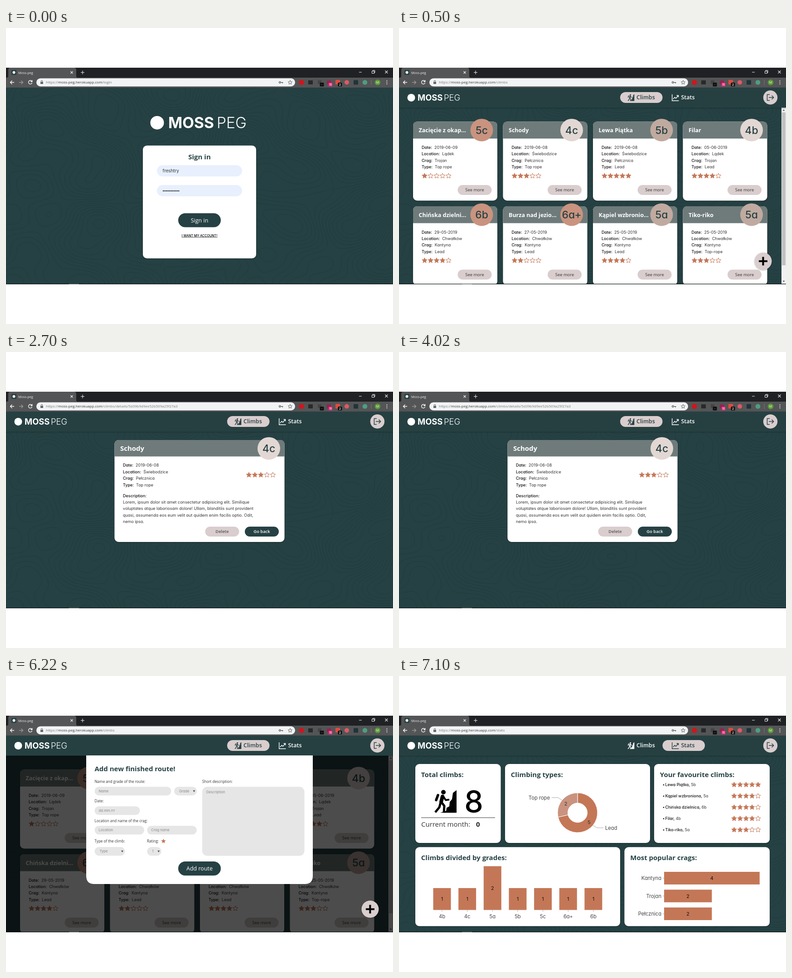
These frames come from a looping animation (854x656 px, 8000 ms). An HTML page:

```html
<!DOCTYPE html>
<html lang="en">
<head>
<meta charset="utf-8">
<title>Moss-peg</title>
<style>
  html, body { margin: 0; width: 100%; height: 100%; overflow: hidden; background: #fff; }
  svg { display: block; width: 854px; height: 656px; font-family: "Open Sans", "Noto Sans", sans-serif; }
  text { white-space: pre; }
  .geo { font-family: Inter, sans-serif; font-feature-settings: "cv11"; }
</style>
</head>
<body>
<svg id="stage" viewBox="0 0 854 656"></svg>
<script>
const TEAL = '#264143', PINK = '#d9cdce', RUST = '#c47757', SALMON = '#c9937f', SAND = '#c0aaa0', CREAM = '#e2d7d3';
const GREY = '#6e7b7a', FIELD = '#e6e6e6', INK = '#333';

// Drawing helpers; each returns SVG markup
const rect = (x, y, w, h, fill, r = 0, more = '') =>
  `<rect x="${x}" y="${y}" width="${w}" height="${h}" rx="${r}" fill="${fill}" ${more}/>`;
const disc = (x, y, r, fill, more = '') => `<circle cx="${x}" cy="${y}" r="${r}" fill="${fill}" ${more}/>`;
const line = (d, stroke, w = 1, more = '') => `<path d="${d}" fill="none" stroke="${stroke}" stroke-width="${w}" ${more}/>`;
const shape = (d, fill) => `<path d="${d}" fill="${fill}"/>`;
const text = (x, y, s, size, fill = INK, weight = 400, more = '') =>
  `<text x="${x}" y="${y}" font-size="${size}" fill="${fill}" font-weight="${weight}" ${more}>${s}</text>`;
const geo = (x, y, s, size, fill, weight, more = '') => text(x, y, s, size, fill, weight, 'class="geo" ' + more);
const MID = 'text-anchor="middle"', END = 'text-anchor="end"';
const at = (x, y, s, scale = 1) => `<g transform="translate(${x} ${y}) scale(${scale})">${s}</g>`;
const shadow = 'filter="url(#shadow)"';

function starPath(x, y, r) {
  const points = Array.from({ length: 10 }, (_, i) => {
    const a = i * Math.PI / 5, q = i % 2 ? r * .45 : r;
    return (x + q * Math.sin(a)).toFixed(2) + ' ' + (y - q * Math.cos(a)).toFixed(2);
  });
  return `M${points.join('L')}Z`;
}
const stars = (x, y, n) => [0, 1, 2, 3, 4].map(i =>
  `<path d="${starPath(x + i * 13.2, y, 6)}" fill="${i < n ? RUST : 'none'}" stroke="${RUST}" stroke-linejoin="round"/>`).join('');

const button = (x, y, w, h, label, size, fill, color, weight = 400) =>
  rect(x, y, w, h, fill, h / 2) + text(x + w / 2, y + h / 2 + size * .36, label, size, color, weight, MID);

// Contour lines of a smooth height field, traced triangle by triangle
function contours() {
  const { sin, ceil } = Math, cell = 6, step = .36;
  const height = (x, y) => sin(x / 57 + 1.6 * sin(y / 63)) + sin(y / 43 + 1.7 * sin(x / 71)) +
    .6 * sin((x + y) / 37) + .3 * sin((x - 2 * y) / 31);
  const point = (x, y) => [x, y, height(x, y)];
  let d = '';
  const trace = tri => {
    const hs = tri.map(p => p[2]), top = Math.max(...hs);
    for (let level = ceil(Math.min(...hs) / step) * step; level < top; level += step) {
      const cuts = [];
      tri.forEach((a, i) => {
        const b = tri[(i + 1) % 3];
        if ((a[2] < level) === (b[2] < level)) return;
        const k = (level - a[2]) / (b[2] - a[2]);
        cuts.push((a[0] + k * (b[0] - a[0])).toFixed(1) + ' ' + (a[1] + k * (b[1] - a[1])).toFixed(1));
      });
      if (cuts.length === 2) d += `M${cuts.join('L')}`;
    }
  };
  for (let x = 0; x < 854; x += cell) for (let y = 132; y < 568; y += cell) {
    const a = point(x, y), b = point(x + cell, y), c = point(x, y + cell), e = point(x + cell, y + cell);
    trace([a, b, c]);
    trace([b, e, c]);
  }
  return line(d, '#1f3a3c', .8);
}

// Icons
const climber = color => disc(22, 5.5, 5, color) +
  line('M20 15L17 27', color, 8, 'stroke-linecap="round"') + line('M10 12L6 23', color, 5.5, 'stroke-linecap="round"') +
  line('M22 15L27 23L35 22', color, 4, 'stroke-linejoin="round"') +
  line('M18 28L24 36L23 51M16 28L13 39L4 50', color, 5, 'stroke-linejoin="round"') +
  shape('M51 1L43 7L41 21L36 27L35 37L29 40L28 47L15 51H51Z', color);
const trend = color => line('M.7 0V14.3H15.5M3 10.5L6.5 6.5L9 9L14 3M10.5 2.5H14.5V6.5', color, 1.4);

const logo = (x, y, size, gap, r, cx) => disc(cx, y - size * .36, r, '#fff') +
  geo(x, y, 'MOSS', size, '#fff', 700) + geo(x + gap, y, 'PEG', size, '#fff', 300);

function browser() {
  const dark = '#222', light = '#eee';
  const badge = (x, s, fill) => rect(x - 4.5, 121, 9, 8.5, fill, 1.5) + geo(x, 128, s, 6.5, '#fff', 600, MID);
  return rect(0, 88, 854, 22, '#202124') + rect(0, 110, 854, 22, '#545556') +
    shape('M2 110Q5 110 5 106V93Q5 88 10 88H150Q155 88 155 93V106Q155 110 158 110Z', '#545556') +
    rect(12, 93, 11, 11, TEAL, 1) + disc(17.5, 98.5, 3, '#fff') + text(27, 101.5, 'Moss-peg', 7.3, light) +
    line('M142.5 96L147.5 101M147.5 96L142.5 101M165 98.5H173M169 94.5V102.5M779 98H785M836.5 94.5L842.5 100.5M842.5 94.5L836.5 100.5', light, 1.1) +
    line('M807.5 95.7H812.5V100.5H807.5ZM809 95.5V94H814V99H812.5', light) +
    line('M18 120.5H9.5M13.5 116.5L9.5 120.5L13.5 124.5', '#fff', 1.3) +
    line('M29 120.5H37.5M33.5 116.5L37.5 120.5L33.5 124.5', '#999', 1.3) +
    line('M57 118A4 4 0 1 0 57.5 121.5M57.7 115.5V119H54.2', '#fff', 1.3) +
    rect(67, 111.5, 571, 18, '#f1f3f4', 9) +
    rect(76, 119.5, 6, 4.5, '#5f6368', .7) + line('M77.3 120V118A1.7 1.7 0 0 1 80.7 118V120', '#5f6368') +
    line('M606 120.3A1.8 1.8 0 1 0 606 120.7H611.5M610 120.5V122.8', '#555', 1.3) +
    line(starPath(627, 120.7, 4.7), '#555', .9) +
    disc(652, 120.5, 5.5, '#d5131b') + rect(667, 116, 10, 9, '#292929') + rect(688, 116, 8, 8, '#444') +
    rect(708, 116, 9, 9, '#8b2850') + rect(727, 115, 10, 10, '#df4b3e', 1) + disc(752, 120.5, 5, '#df5964') +
    rect(767, 115.5, 10, 10, '#20333b', 1) + disc(792, 120.5, 5.3, '#4c9e83') +
    badge(697, '·', '#111') + badge(716, '11', '#df2877') + badge(737, '2', '#111') +
    line('M806 115V126', '#777') + disc(820, 120.5, 6.3, '#5b9b36') + text(820, 123, 'M', 7, '#fff', 400, MID) +
    [117, 120.5, 124].map(y => disc(840.5, y, 1, light)).join('');
}

const address = path => text(88, 123.3,
  `https://<tspan fill="${INK}">moss-peg.herokuapp.com</tspan>${path}`, 8, '#777');

function header(active) {
  const tab = (x, i, label, icon) => {
    const color = i === active ? TEAL : '#fff';
    return (i === active ? rect(x, 142, 93.5, 24, PINK, 12) : '') + icon(color) +
      text(i ? 622.5 : 524, 158.4, label, 12.5, color, 600);
  };
  return rect(0, 132, 854, 44.5, TEAL, 0, shadow) + logo(41, 161, 18.4, 58, 8.5, 27) +
    tab(488, 0, 'Climbs', c => at(504, 146.5, climber(c), .3)) +
    tab(581.5, 1, 'Stats', c => at(602, 147, trend(c))) +
    disc(819.5, 154, 15.7, PINK) +
    line('M818 147.5H812.5V160.5H818M816 154H826.5M822.5 149.8L826.7 154L822.5 158.2', TEAL, 1.5);
}

function facts(x, y, values) {
  return ['Date', 'Location', 'Crag', 'Type'].map((label, i) => geo(x, y + i * 14.4,
    `<tspan fill="#111" font-weight="500">${label}:</tspan><tspan dx="5">${values[i]}</tspan>`, 9, INK)).join('');
}
const grade = (x, y, s, fill) => disc(x, y, 25, fill) + geo(x, y + 8.3, s, 23, TEAL, 500, MID);
const cardHead = (x, y, w, h) =>
  shape(`M${x} ${y + h}V${y + 9}q0-9 9-9H${x + w - 9}q9 0 9 9V${y + h}Z`, GREY);

const climbs = [
  ['Zacięcie z okap...', '5c', SALMON, '2019-06-09', 'Lądek', 'Trojan', 'Top rope', 1],
  ['Schody', '4c', CREAM, '2019-06-08', 'Świebodzice', 'Pełcznica', 'Top rope', 3],
  ['Lewa Piątka', '5b', SAND, '2019-06-08', 'Świebodzice', 'Pełcznica', 'Lead', 5],
  ['Filar', '4b', CREAM, '05-06-2019', 'Lądek', 'Trojan', 'Lead', 4],
  ['Chińska dzielni...', '6b', SALMON, '29-05-2019', 'Chwałków', 'Kantyna', 'Lead', 4],
  ['Burza nad jezio...', '6a+', SALMON, '27-05-2019', 'Chwałków', 'Kantyna', 'Lead', 2],
  ['Kąpiel wzbronio...', '5a', SAND, '25-05-2019', 'Chwałków', 'Kantyna', 'Lead', 4],
  ['Tiko-riko', '5a', SAND, '25-05-2019', 'Chwałków', 'Kantyna', 'Top-rope', 3],
];
const climbCard = ([name, level, color, date, place, crag, type, rating], i) => {
  const x = 31 + i % 4 * 198.5, y = i < 4 ? 207.5 : 395;
  return rect(x, y, 186, 175, '#fff', 9, shadow) + cardHead(x, y, 186, 37.5) +
    text(x + 12.5, y + 23.5, name, 12.5, '#fff', 700) + grade(x + 151.5, y + 18.7, level, color) +
    facts(x + 19, y + 60.5, [date, place, crag, type]) + stars(x + 25.5, y + 120.3, rating) +
    button(x + 98.5, y + 140.5, 75, 22, 'See more', 9.4, PINK, INK, 500);
};
const list = climbs.map(climbCard).join('') + rect(844, 176, 10, 392, '#f1f1f1') + rect(845, 187, 8, 339, '#c1c1c1') +
  shape('M846.5 183.5L849 180.5L851.5 183.5ZM846.5 560L849 563L851.5 560Z', '#555');
const addButton = disc(803.5, 516.7, 19, PINK, shadow) + line('M794 516.7H813M803.5 507.2V526.2', '#000', 4);

const login = address('/login') + logo(358, 222, 33.5, 107, 15, 333.5) +
  rect(302, 260.5, 250, 250, '#fff', 9, shadow) + text(427, 290.5, 'Sign in', 15, TEAL, 700, MID) +
  rect(333, 304, 188, 25, '#e8f0fe', 12.5) + geo(345.5, 320.3, 'freshtry', 9.8, INK) +
  rect(333, 348, 188, 25, '#e8f0fe', 12.5) +
  line('M347.2 361H382', '#222', 2.6, 'stroke-linecap="round" stroke-dasharray="0 3.4"') +
  button(380, 410.5, 94, 31, 'Sign in', 12.5, TEAL, '#fff') +
  geo(427, 462.5, 'I WANT MY ACCOUNT!', 7.1, '#000', 500, MID + ' text-decoration="underline"');

const details = address('/climbs/details/5d39b9d9ee52b509a25f27a3') + header(0) +
  rect(239.5, 195, 375, 226, '#fff', 9, shadow) + cardHead(239.5, 195, 375, 36.5) +
  text(252, 218.5, 'Schody', 15, '#fff', 700) + grade(580, 213.7, '4c', CREAM) +
  facts(258, 254.3, ['2019-06-08', 'Świebodzice', 'Pełcznica', 'Top rope']) + stars(536, 272.5, 3) +
  geo(258, 321.5, 'Description:', 9, '#111', 500) +
  ['Lorem, ipsum dolor sit amet consectetur adipisicing elit. Similique',
    'voluptates atque laboriosam dolore! Ullam, blanditiis sunt provident',
    'quasi, assumenda eos eum velit aut quidem enim facilis optio. Odit,',
    'nemo ipsa.'].map((s, i) => geo(258, 336 + i * 14.4, s, 9, INK)).join('') +
  button(439.5, 387, 75, 22, 'Delete', 9.4, PINK, '#555', 600) +
  button(527, 387, 75, 22, 'Go back', 9.4, TEAL, '#fff', 600);

const field = (x, y, w, hint, inset = 9) => rect(x, y, w, 19.3, FIELD, 9.6) + geo(x + inset, y + 12.4, hint, 7.7, '#888');
const select = (x, y, w, hint) => field(x, y, w, hint, 11) +
  shape(`M${x + w - 8.5} ${y + 7.8}h5l-2.5 4.2Z`, '#555');
const form = address('/climbs') + list + rect(0, 176, 854, 392, '#000', 0, 'opacity=".7"') + header(0) +
  shape('M177 176H677V443Q677 461 659 461H195Q177 461 177 443Z', '#fff') +
  text(195.5, 211, 'Add new finished route!', 15, TEAL, 700) +
  [[195.5, 236.7, 'Name and grade of the route:'], [433, 236.7, 'Short description:'], [195.5, 280, 'Date:'],
    [195.5, 323.7, 'Location and name of the crag:'], [195.5, 368.5, 'Type of the climb:'], [311, 368.5, 'Rating:']]
    .map(([x, y, s]) => text(x, y, s, 8.1)).join('') +
  field(195.5, 245.5, 169, 'Name') + select(371, 245.5, 50, 'Grade') + field(195.5, 288.7, 100, 'dd.mm.rrr') +
  field(195.5, 332, 109.5, 'Location') + field(311.3, 332, 109.5, 'Crag name') +
  select(195.5, 379, 67, 'Type') + select(311.3, 379, 31.5, '1') + shape(starPath(347.5, 366, 5.5), RUST) +
  rect(433, 245.5, 225.5, 153, FIELD, 11) + geo(442, 260, 'Description', 7.7, '#888') +
  button(380, 411, 94, 31.3, 'Add route', 12.5, TEAL, '#fff') + addButton;

const panel = (x, y, w, title) => rect(x, y, w, 175, '#fff', 9, shadow) + text(x + 12.8, y + 28.5, title, 15, TEAL, 700);
function donut(x, y) {
  const ring = (from, to, fill) => {
    const p = (turn, r) => `${x + r * Math.sin(turn * 2 * Math.PI)} ${y - r * Math.cos(turn * 2 * Math.PI)}`;
    const big = +(to - from > .5);
    return `<path d="M${p(from, 44)}A44 44 0 ${big} 1 ${p(to, 44)}L${p(to, 21.5)}A21.5 21.5 0 ${big} 0 ${p(from, 21.5)}Z"
      fill="${fill}" stroke="#fff"/>`;
  };
  return ring(0, 5 / 7, RUST) + ring(5 / 7, 1, SALMON);
}
const favourites = [['Lewa Piątka', '5b', 5], ['Kąpiel wzbroniona', '5a', 4], ['Chińska dzielnica', '6b', 4],
  ['Filar', '4b', 4], ['Tiko-riko', '5a', 3]];
const stats = address('/stats') + header(1) +
  panel(36, 195, 188.5, 'Total climbs:') + at(76, 252, climber('#000')) +
  geo(165, 302, '8', 66, '#000', 500, MID) + line('M49 314H212', '#333') +
  text(49, 334, 'Current month:', 15) + text(170, 334, '0', 15, '#222', 700) +
  panel(234, 195, 320, 'Climbing types:') + donut(394, 303) +
  line('M337 269.5H351L360 275.5M428 331L437 336.5H451', '#aaa') +
  geo(333, 273.6, 'Top rope', 11.2, '#444', 400, END) + geo(455, 340.7, 'Lead', 11.2, '#444') +
  geo(368, 287, '2', 11, INK, 400, MID) + geo(419.5, 327.5, '5', 11, INK, 400, MID) +
  panel(563, 195, 255, 'Your favourite climbs:') +
  favourites.map(([name, level, n], i) => disc(584, 241.3 + i * 25, 1.3, '#111') +
    geo(587.5, 244.3 + i * 25, `<tspan fill="#111" font-weight="500">${name},</tspan> ${level}`, 8.9, INK) +
    stars(739.5, 241 + i * 25, n)).join('') +
  panel(36, 379.3, 452, 'Climbs divided by grades:') +
  ['4b', '4c', '5a', '5b', '5c', '6a+', '6b'].map((level, i) => {
    const x = 95 + i * 55.65, n = level === '5a' ? 2 : 1, h = n * 48.5;
    return rect(x - 19.5, 518.5 - h, 39, h, RUST) + geo(x, 522.5 - h / 2, n, 11, '#111', 400, MID) +
      line(`M${x} 518.5v4`, '#aaa') + geo(x, 537, level, 11.2, '#444', 400, MID);
  }).join('') +
  panel(497.5, 379.3, 320.5, 'Most popular crags:') +
  [['Kantyna', 4], ['Trojan', 2], ['Pełcznica', 2]].map(([name, n], i) => {
    const y = 434 + i * 39.5, w = n * 52.7;
    return rect(585, y, w, 28, RUST) + geo(585 + w / 2, y + 18.2, n, 11, '#111', 400, MID) +
      line(`M582 ${y + 14}h3`, '#aaa') + geo(579, y + 18.2, name, 11.2, '#444', 400, END);
  }).join('');

const scenes = [
  [0, login],
  [500, address('/climbs') + list + header(0) + addButton],
  [2700, details],
  [4900, form],
  [7100, stats],
];

const stage = document.getElementById('stage');
stage.innerHTML = `<defs><filter id="shadow" x="-20%" y="-20%" width="140%" height="150%">
    <feDropShadow dx="0" dy="1" stdDeviation="1.5" flood-opacity=".35"/></filter></defs>` +
  rect(0, 132, 854, 436, TEAL) + contours() + browser() +
  scenes.map(([, s]) => `<g class="scene">${s}</g>`).join('') +
  rect(0, 566.8, 854, 1.2, '#0c1414') + rect(139, 566.8, 22, 1.2, '#5a6060') + rect(0, 568, 854, 88, '#fff');

const groups = [...stage.querySelectorAll('.scene')];
function frame() {
  const time = performance.now() % 8000;
  const current = scenes.filter(([start]) => start <= time).length - 1;
  groups.forEach((g, i) => g.style.display = i === current ? '' : 'none');
  requestAnimationFrame(frame);
}
frame();
</script>
</body>
</html>
```
